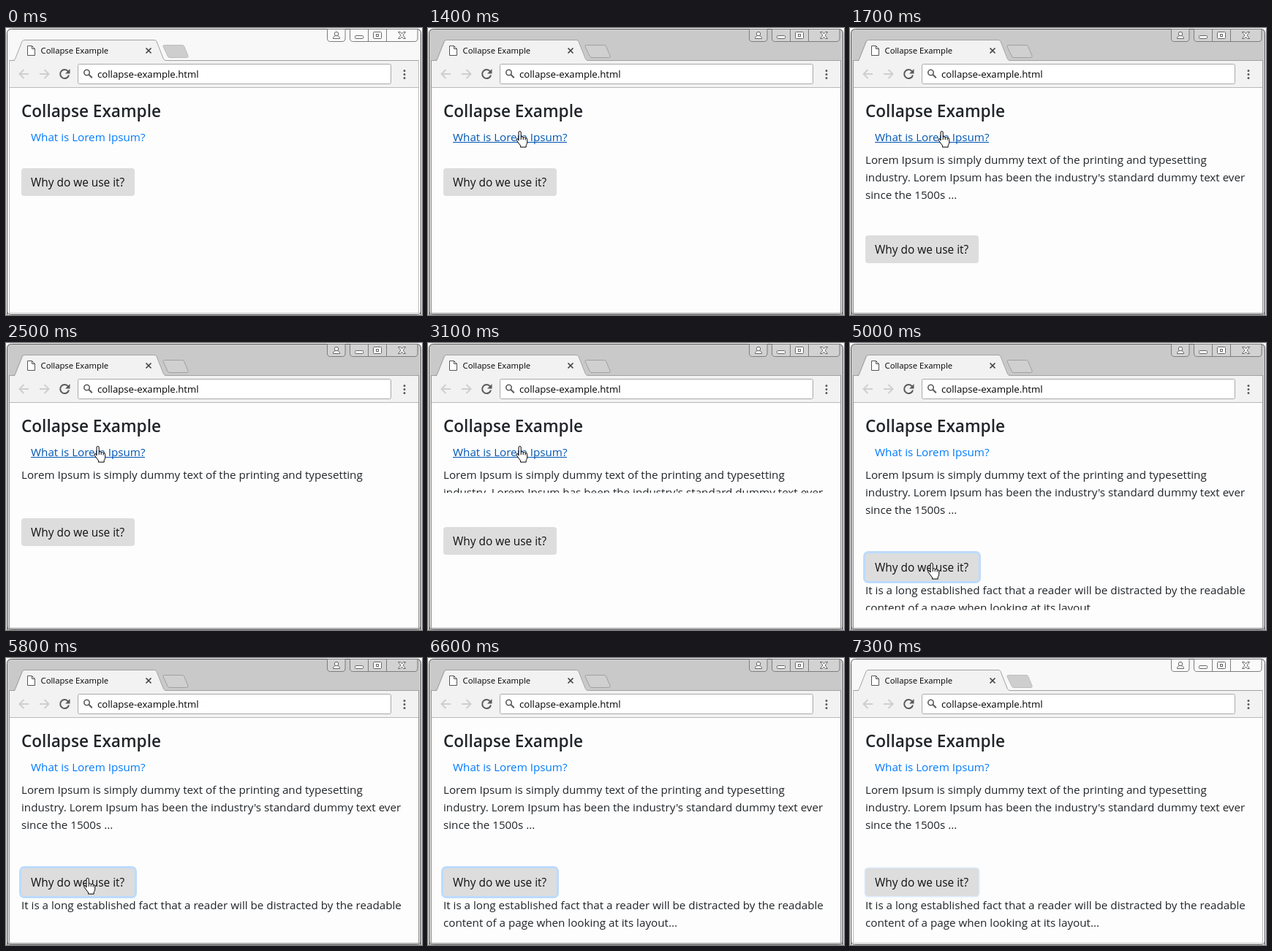
An HTML page that plays this animation: 569 by 393 pixels, repeating every 7400 ms.

```html
<!DOCTYPE html>
<html lang="en">
<head>
<meta charset="utf-8">
<title>Collapse Example</title>
<style>
  html, body { margin: 0; width: 100%; height: 100%; overflow: hidden; background: #fff; }
  svg { display: block; }
  text { font: 15.2px "Open Sans", "Noto Sans", sans-serif; fill: #212529; white-space: pre; }
  .line { fill: none; stroke: #5a5a5a; }
  .control { stroke: #7d7d7d; }
  .glyph { fill: #fff; stroke: #666; }
  #tabTitle { font-size: 11.3px; fill: #000; }
  #url { font-size: 13.2px; fill: #000; }
  #heading { font-size: 22.6px; font-weight: 600; }
  #button text { font-size: 15.4px; fill: #111; }
</style>
</head>
<body>
<svg width="569" height="393" viewBox="0 0 569 393">
  <defs>
    <clipPath id="clip1"><rect id="area1" x="5" y="169" width="559" height="0"/></clipPath>
    <clipPath id="clip2"><rect id="area2" x="5" y="326" width="559" height="0"/></clipPath>
  </defs>

  <!-- window frame -->
  <path id="frame" d="M1.5 393V7.5q0-6 6-6H561.500q6 0 6 6V393" stroke="#555"/>
  <path class="line" d="M1.500 387q0 5.500 5 5.500H562.500q5 0 5-5.500"/>
  <rect id="inner" x="4.500" y="44.500" width="560" height="346" fill="#fdfdfd"/>
  <rect x="5" y="45" width="559" height="36" fill="#f2f2f2"/>
  <path class="line" d="M5 81.500H564" style="stroke:#b9b9b9"/>

  <!-- window controls -->
  <g id="controls">
    <path class="control" d="M439.500 1.500V14q0 4.500 4 4.500H460q4 0 4-4.500V1.500z"/>
    <path class="control" d="M470.500 1.500V14q0 4.500 4 4.500H559q4 0 4-4.500V1.500z"/>
  </g>
  <path class="line control" d="M495.500 2V18M520.500 2V18"/>
  <path class="glyph" d="M447.500 14.500q0-4 4.500-4t4.500 4z"/>
  <circle class="glyph" cx="452" cy="8" r="2.700"/>
  <rect class="glyph" x="477.500" y="10.500" width="11" height="4" rx="1"/>
  <rect class="glyph" x="502.500" y="5.500" width="11" height="9" rx="1"/>
  <rect class="glyph" x="506.500" y="8.500" width="3" height="3"/>
  <path class="glyph" d="M536.500 5.500h3l2 2.500 2-2.500h3l-3.500 4.500 3.500 4.500h-3l-2-2.500-2 2.500h-3l3.500-4.500z"/>

  <!-- tabs -->
  <path d="M5 45.500H10q2 0 3-2L23 18.500q1-2 3-2H203q2 0 3 2L216 42.500q1 2 3 2H219V46H5z" fill="#f2f2f2"/>
  <path class="line" d="M5 44.500H9q2.500 0 3.500-2L22 18.500q1-2 3-2H203q2 0 3 2L215.500 42.500q1 2 3.500 2H564" style="stroke:#a2a2a2"/>
  <path id="newTab" d="M216.500 23.500H241q2 0 2.700 1.700L249 38q.6 2.500-1.500 2.500H224q-2 0-2.700-1.700L215 25.500q-.5-2 1.500-2z"/>
  <path d="M29.500 24.500h6l4 4v9h-10zM35.500 24.500v4h4" fill="#fff" stroke="#555"/>
  <path class="line" d="M191.500 27.500l7 7m0-7l-7 7" style="stroke:#444;stroke-width:1.700"/>
  <text id="tabTitle" x="47.500" y="35">Collapse Example</text>

  <!-- toolbar -->
  <g class="line" stroke-width="2">
    <path d="M31 63H18.500m6-6l-6 6 6 6M46 63h12.500m-6-6l6 6-6 6" stroke="#cfcfd2"/>
    <path d="M85 59.500a6 6 0 1 0 1 5"/>
  </g>
  <path d="M87.500 56v6.500H81z" fill="#5a5a5a"/>
  <rect x="98.500" y="49.500" width="428" height="27" rx="2" fill="#fff" stroke="#a9a9a9"/>
  <circle class="line" cx="110.500" cy="61" r="3.700" stroke-width="1.600"/>
  <path class="line" d="M113.300 63.800l4.500 4.500" stroke-width="2"/>
  <text id="url" x="125" y="68">collapse-example.html</text>
  <path d="M545 58.500v0m0 5v0m0 5v0" stroke="#5a5a5a" stroke-width="3" stroke-linecap="round"/>

  <!-- page -->
  <text id="heading" x="21" y="122">Collapse Example</text>
  <text id="link" x="34" y="155">What is Lorem Ipsum?</text>
  <path id="underline" d="M34 156.500H190"/>
  <g clip-path="url(#clip1)">
    <text x="21" y="186">Lorem Ipsum is simply dummy text of the printing and typesetting</text>
    <text x="21" y="210">industry. Lorem Ipsum has been the industry's standard dummy text ever</text>
    <text x="21" y="234">since the 1500s ...</text>
  </g>
  <g id="button">
    <rect id="ring" width="155" height="38" rx="4" fill="#007bff" stroke="#007bff" stroke-linejoin="round"/>
    <rect width="155" height="38" rx="4" fill="#ddd"/>
    <text x="13" y="25">Why do we use it?</text>
  </g>
  <g clip-path="url(#clip2)">
    <text x="21" y="344">It is a long established fact that a reader will be distracted by the readable</text>
    <text x="21" y="368">content of a page when looking at its layout...</text>
  </g>

  <path id="arrow" d="M.5 .5V16l3.500-3.400 2.600 6 2.400-1-2.600-5.900H11.500z" fill="#fff" stroke="#000"/>
  <g id="hand">
    <path d="M4 13V2a1.600 1.600 0 0 1 3.200 0V8q2.500-1 3 .8 2.500-.8 3 .8 2.500-.3 2.500 2v4q0 2-1.500 4v2.500H6.500v-2q-2-2.500-5.500-7.500-.8-2 1-2 1 .2 2 2.400z" fill="#fff" stroke="#000"/>
    <path d="M7.200 8v4M10.200 9v3M13.200 10v2.500" stroke="#000"/>
  </g>
</svg>
<script>
const LOOP = 7400, STEP = 100, DURATION = 350;
const $ = id => document.getElementById(id);
const set = (id, attrs) => { for (const k in attrs) $(id).setAttribute(k, attrs[k]); };

// The CSS "ease" curve, solved by bisection
function ease(x) {
  if (x <= 0) return 0;
  if (x >= 1) return 1;
  let lo = 0, hi = 1;
  const bezier = (a, b, s) => 3 * a * s * (1 - s) ** 2 + 3 * b * s * s * (1 - s) + s ** 3;
  for (let i = 0; i < 24; i++) {
    const mid = (lo + hi) / 2;
    if (bezier(.25, .25, mid) < x) lo = mid; else hi = mid;
  }
  return bezier(.1, 1, lo);
}

// Panel height after opening, closing and opening again
function panelHeight(t, full, open, close, reopen) {
  const p = start => ease((t - start) / DURATION);
  return full * (p(open) - p(close) + p(reopen));
}

// [time, shape, x, y]; each pose holds until the next
const POSES = [
  [0, ""],
  [400, "arrow", 515, 56], [500, "arrow", 450, 73], [600, "arrow", 379, 93],
  [700, "arrow", 289, 121], [800, "arrow", 216, 136],
  [900, "hand", 139, 141], [1000, "hand", 120, 141],
  [3500, "arrow", 119, 190], [3600, "arrow", 111, 257], [3700, "hand", 106, 301],
  [6100, "arrow", 190, 290], [6200, "arrow", 265, 268], [6300, "arrow", 350, 240],
  [6400, "arrow", 415, 212], [6500, "arrow", 458, 192],
  [6600, ""]
];

function draw(t) {
  const active = t >= 1400 && t < 7300;
  set("frame", { fill: active ? "#c9c9c9" : "#f8f8f8" });
  set("inner", { stroke: active ? "#999" : "#bdbdbd" });
  set("controls", { fill: active ? "#d2d2d2" : "#fafafa" });
  set("newTab", { fill: active ? "#d0d0d0" : "#cecece", stroke: active ? "#a0a0a0" : "#bcbcbc" });

  const h1 = panelHeight(t, 72, 1450, 2364, 2997);
  const h2 = panelHeight(t, 48, 3948, 4950, 5700);
  set("area1", { height: h1 });
  set("area2", { height: h2 });
  const top = h1 > .5 ? 216 + Math.round(h1) : 192;
  set("button", { transform: `translate(21 ${top})` });

  // The focus ring grows and fades in together
  const focus = t < 3900 ? 0 : t < 4000 || !active ? .5 : 1;
  set("ring", { opacity: .25 * focus, "stroke-width": 6 * focus });

  const hover = t >= 900 && t < 3500;
  const color = hover ? "#0056b3" : "#007bff";
  $("link").style.fill = color;
  set("underline", { stroke: color, opacity: hover || t >= 1400 && t < 3900 ? 1 : 0 });

  const [, shape, x, y] = POSES.findLast(pose => pose[0] <= t);
  for (const id of ["arrow", "hand"])
    set(id, id === shape ? { visibility: "visible", transform: `translate(${x} ${y})` } : { visibility: "hidden" });
}

const began = performance.now();
function tick() {
  const t = (performance.now() - began) % LOOP;
  draw(Math.floor(t / STEP) * STEP);
  requestAnimationFrame(tick);
}
tick();
</script>
</body>
</html>
```
